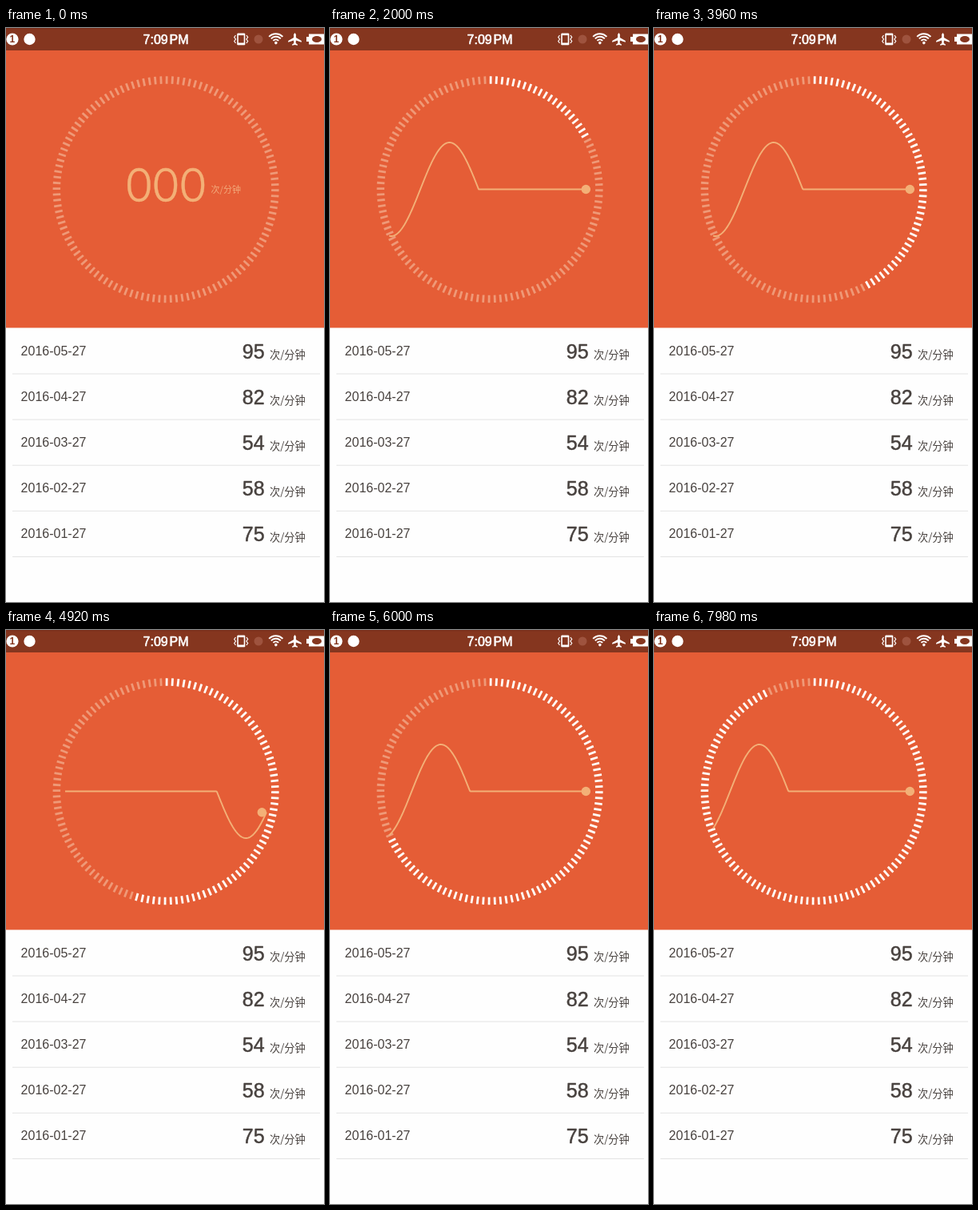
Write an HTML page with a canvas that moves like this. It is 398x717 px and loops after 8 s.

```html
<!DOCTYPE html>
<html lang="zh">
<head>
<meta charset="utf-8">
<title>Heart rate</title>
<style>
html, body { margin: 0; width: 100%; height: 100%; overflow: hidden; background: #fefefe; }
canvas { display: block; width: 100vw; height: 100vh; }
</style>
</head>
<body>
<canvas id="stage"></canvas>
<script>
const W = 398, H = 717, LOOP = 8000, START = 500;
const ORANGE = '#e55d36', BAR = '#85361f', SAND = '#f3b077', INK = '#48423f';
const LATIN = '"Liberation Sans", Arial, sans-serif';
const CJK = '"Noto Sans CJK SC", "Noto Sans CJK", sans-serif';
const UNIT = '次/分钟';
const ROWS = [['05', 95], ['04', 82], ['03', 54], ['02', 58], ['01', 75]];

const DIAL = { x: 200.1, y: 201.7, inner: 132, outer: 141.5, count: 120, turn: 0.0075 };
const TICK_FROM = 582, TICK_MS = 65.5;

// One sine beat followed by two beats of rest.
const WAVE = { left: 74, right: 326, base: 201.5, amp: 58.5, beat: 146, lead: 21 };
// [time, distance scrolled]
const SCROLL = [[605, 0], [1360, 164], [2880, 503], [3960, 744.5], [4920, 959], [6000, 1193.5], [8000, 1643]];

const canvas = document.getElementById('stage');
const g = canvas.getContext('2d');
const dpr = window.devicePixelRatio || 1;
canvas.width = Math.round(W * dpr);
canvas.height = Math.round(H * dpr);
g.scale(canvas.width / W, canvas.height / H);

function text(str, x, y, font, color, align = 'left', heft = 0) {
  g.font = font;
  g.textAlign = align;
  g.fillStyle = color;
  g.fillText(str, x, y);
  if (heft) {
    g.lineWidth = heft;
    g.lineJoin = 'round';
    g.strokeStyle = color;
    g.strokeText(str, x, y);
  }
}

function rect(x, y, w, h, color) {
  g.fillStyle = color;
  g.fillRect(x, y, w, h);
}

function oval(x, y, rx, ry, color) {
  g.fillStyle = color;
  g.beginPath();
  g.ellipse(x, y, rx, ry, 0, 0, Math.PI * 2);
  g.fill();
}

function disc(x, y, r, color) {
  oval(x, y, r, r, color);
}

function path(points, width, color) {
  g.beginPath();
  points.forEach(([x, y]) => g.lineTo(x, y));
  g.lineWidth = width;
  g.strokeStyle = color;
  g.lineJoin = 'miter';
  g.stroke();
}

function phoneIcon() {
  g.lineWidth = 1.6;
  g.strokeStyle = '#fff';
  g.strokeRect(290, 7.5, 8.5, 13);
  rect(290, 6.7, 8.5, 2.4, '#fff');
  rect(290, 18.5, 8.5, 2.6, '#fff');
  for (const [x, d] of [[286.6, -1], [301.8, 1]]) {
    path([0, 1, 2, 3, 4].map(i => [x + (i % 2 ? d : -d) * 0.9, 9 + i * 2.5]), 1.2, '#fff');
  }
}

function wifiIcon() {
  g.strokeStyle = '#fff';
  g.lineWidth = 2;
  for (const r of [4.6, 8.2, 11.8]) {
    g.beginPath();
    g.arc(337.8, 19, r, -Math.PI * 0.76, -Math.PI * 0.24);
    g.stroke();
  }
  disc(337.8, 18.6, 1.8, '#fff');
}

function planeIcon() {
  const half = [[0, 6], [1.4, 8], [1.4, 12], [8.3, 16], [8.3, 17.8], [1.4, 15.6], [1.2, 19], [3.4, 20.6], [3.4, 21.8], [0, 21]];
  g.fillStyle = '#fff';
  g.beginPath();
  half.forEach(([x, y]) => g.lineTo(361.5 + x, y));
  half.reverse().forEach(([x, y]) => g.lineTo(361.5 - x, y));
  g.fill();
}

function batteryIcon() {
  rect(376, 11, 4, 6, '#fff');
  rect(379, 7.5, 19, 13, '#fff');
  oval(389, 14, 6, 4, BAR);
}

function statusBar() {
  rect(0, 0, W, 28, BAR);
  rect(0, 0, W, 1.5, '#7b301c');
  disc(8, 14, 7.6, '#fff');
  text('1', 7.8, 18.4, 'bold 12px ' + LATIN, BAR, 'center');
  disc(29.5, 14, 7.2, '#fff');
  text('7:09', 171.6, 20, '16px ' + LATIN, '#fff', 'left', 0.6);
  text('PM', 228.6, 20, '16px ' + LATIN, '#fff', 'right', 0.6);
  phoneIcon();
  disc(316, 14, 5.5, '#9e533e');
  wifiIcon();
  planeIcon();
  batteryIcon();
}

function list() {
  ROWS.forEach(([month, rate], i) => {
    const y = 374.5 + i * 57.1;
    text(`2016-${month}-27`, 18.6, y + 34.5, '16px ' + LATIN, INK);
    text(rate, 323.6, y + 38.5, '25px ' + LATIN, INK, 'right', 0.5);
    text(UNIT, 374.7, y + 38.5, '13.2px ' + CJK, INK, 'right');
    rect(8, y + 57, 385, 1, '#e3e3e3');
  });
}

function dial(lit) {
  for (let i = 0; i < DIAL.count; i++) {
    const a = i / DIAL.count * Math.PI * 2 + DIAL.turn;
    const sx = Math.sin(a), sy = -Math.cos(a);
    const color = i < lit ? '#fffdf8' : '#ef9977';
    path([DIAL.inner, DIAL.outer].map(r => [DIAL.x + sx * r, DIAL.y + sy * r]), 2.8, color);
  }
}

function scrollAt(t) {
  if (t <= SCROLL[0][0]) return 0;
  const i = SCROLL.findIndex(k => t < k[0]);
  const [t0, s0] = SCROLL[i - 1], [t1, s1] = SCROLL[i];
  return s0 + (s1 - s0) * (t - t0) / (t1 - t0);
}

function waveY(u) {
  const w = u - WAVE.lead;
  const p = w < 0 ? 1 : (w / WAVE.beat) % 3;
  return WAVE.base + (p < 1 ? WAVE.amp * Math.sin(p * Math.PI * 2) : 0);
}

function pulse(t) {
  const head = WAVE.right - scrollAt(t);
  const points = [];
  for (let x = Math.max(WAVE.left, head); x < WAVE.right; x++) points.push([x, waveY(x - head)]);
  const end = waveY(WAVE.right - head);
  points.push([WAVE.right, end]);
  path(points, 1.9, SAND);
  disc(320.3, end, 5.7, SAND);
}

function idle() {
  [166.5, 200, 234].forEach(x => text('0', x, 216.5, '300 58px Inter, sans-serif', SAND, 'center', 0.4));
  text(UNIT, 256.6, 206, '11px ' + CJK, '#f2aa7c');
}

function frame(now) {
  const t = now % LOOP;
  rect(0, 0, W, H, '#fefefe');
  rect(0, 0, W, 374.5, ORANGE);
  statusBar();
  list();
  dial(Math.max(0, Math.floor((t - TICK_FROM) / TICK_MS)));
  if (t < START) idle();
  else pulse(t);
}

const origin = performance.now();
function loop() {
  frame(performance.now() - origin);
  requestAnimationFrame(loop);
}
loop();
</script>
</body>
</html>
```
